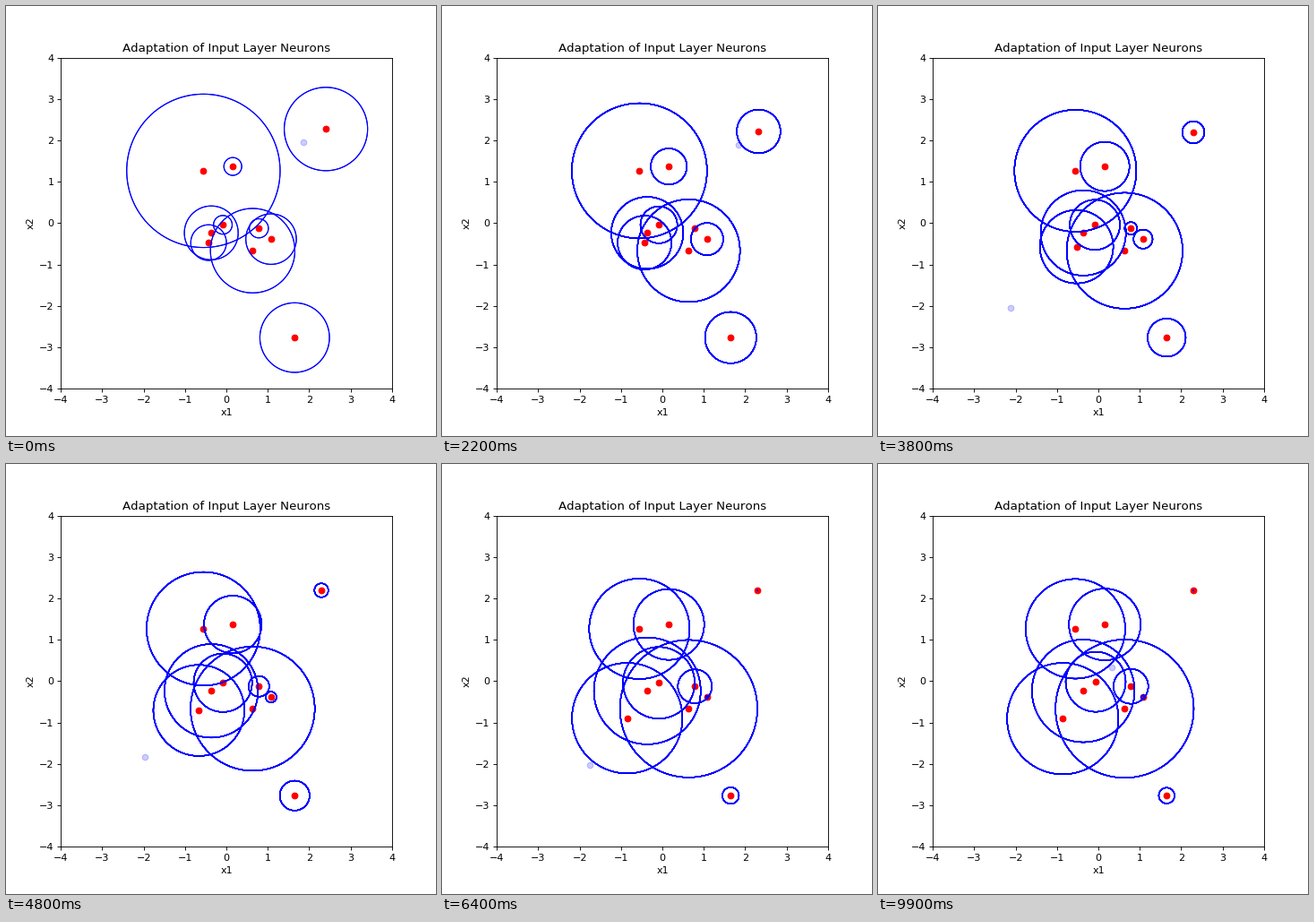
Animation, 480 px wide and 480 px high, one loop 10000 ms. Source, as a matplotlib script:

```python
import numpy as np
import matplotlib.pyplot as plt
from matplotlib.animation import FuncAnimation
from matplotlib.collections import LineCollection

plt.rcParams["text.kerning_factor"] = 6

FRAMES, INTERVAL = 100, 100
SHRINK = 0.01                       # radius lost per training step
SECOND, TRAINED, LAST = 33, 65, 88  # steps at which the samples move on
MAX_PASSES = 20

# x, y, signed radius at the start
NEURONS = np.array([
    (-0.555, 1.265, 1.853),
    (0.155, 1.37, -0.215),
    (0.635, -0.665, -1.02),
    (0.785, -0.125, 0.23),
    (1.08, -0.385, 0.61),
    (1.65, -2.765, 0.84),
    (-0.365, -0.235, -0.65),   # LEFT
    (-0.085, -0.04, -0.225),   # MIDDLE
    (2.405, 2.275, 1.007),     # UPPER
    (-0.43, -0.47, -0.43),     # LOWER
])
LEFT, MIDDLE, UPPER, LOWER = 6, 7, 8, 9


def make_samples():
    """Two clusters, then scattered points, then a central cluster."""
    rng = np.random.default_rng(4)
    scattered = LAST - TRAINED - 2
    return np.vstack([
        rng.normal(2, 0.2, (SECOND + 1, 2)),
        rng.normal(-2, 0.15, (TRAINED - SECOND + 1, 2)),
        rng.uniform((-2.15, -2.8), (2.1, 2.1), (scattered, 2)),
        rng.normal((0, 0.2), 0.25, (FRAMES - LAST, 2)),
    ])


def progress(step, start, end):
    return np.clip((step - start) / (end - start), 0, 1)


def state(step):
    """Neuron centres and radii after the given number of steps."""
    n = NEURONS.copy()
    n[:, 2] -= SHRINK * min(step, TRAINED)

    # one neuron wins each of the two outer clusters
    first = progress(step, 0, SECOND) ** 0.8
    n[UPPER] -= first * np.array([0.11, 0.08, 0.36])

    second = progress(step, SECOND, TRAINED)
    n[LOWER, :2] -= second ** 0.8 * np.array([0.43, 0.435])
    n[LOWER, 2] -= 0.265 * (1 - (1 - second) ** 2)

    # two neurons answer to the central cluster
    last = progress(step, LAST, FRAMES - 1)
    n[MIDDLE] += last * np.array([0.02, 0.025, 0.15])
    n[LEFT, 2] += last * 0.06
    return n


samples = make_samples()
angle = np.linspace(0, 2 * np.pi, 200)
unit = np.column_stack([np.cos(angle), np.sin(angle)])

fig, ax = plt.subplots(figsize=(6, 6), dpi=80)
ax.set_aspect("equal")
ax.set(xlim=(-4, 4), ylim=(-4, 4), xlabel="x1", ylabel="x2",
       title="Adaptation of Input Layer Neurons")
sample, = ax.plot([], [], "bo", alpha=0.2)
centres, = ax.plot([], [], "ro")
rings = LineCollection([], colors="b", linewidths=1, zorder=3)
ax.add_collection(rings, autolim=False)


def update(step):
    n = state(step)
    sample.set_data(samples[step:step + 1].T)
    centres.set_data(n[:, 0], n[:, 1])
    # circles are drawn over themselves, so their edges harden with time
    passes = min(step + 2, MAX_PASSES)
    rings.set_segments([c[:2] + c[2] * unit for c in n] * passes)
    return sample, centres, rings


anim = FuncAnimation(fig, update, frames=FRAMES, interval=INTERVAL,
                     init_func=lambda: update(0), repeat=True, repeat_delay=0)
plt.show()
```
